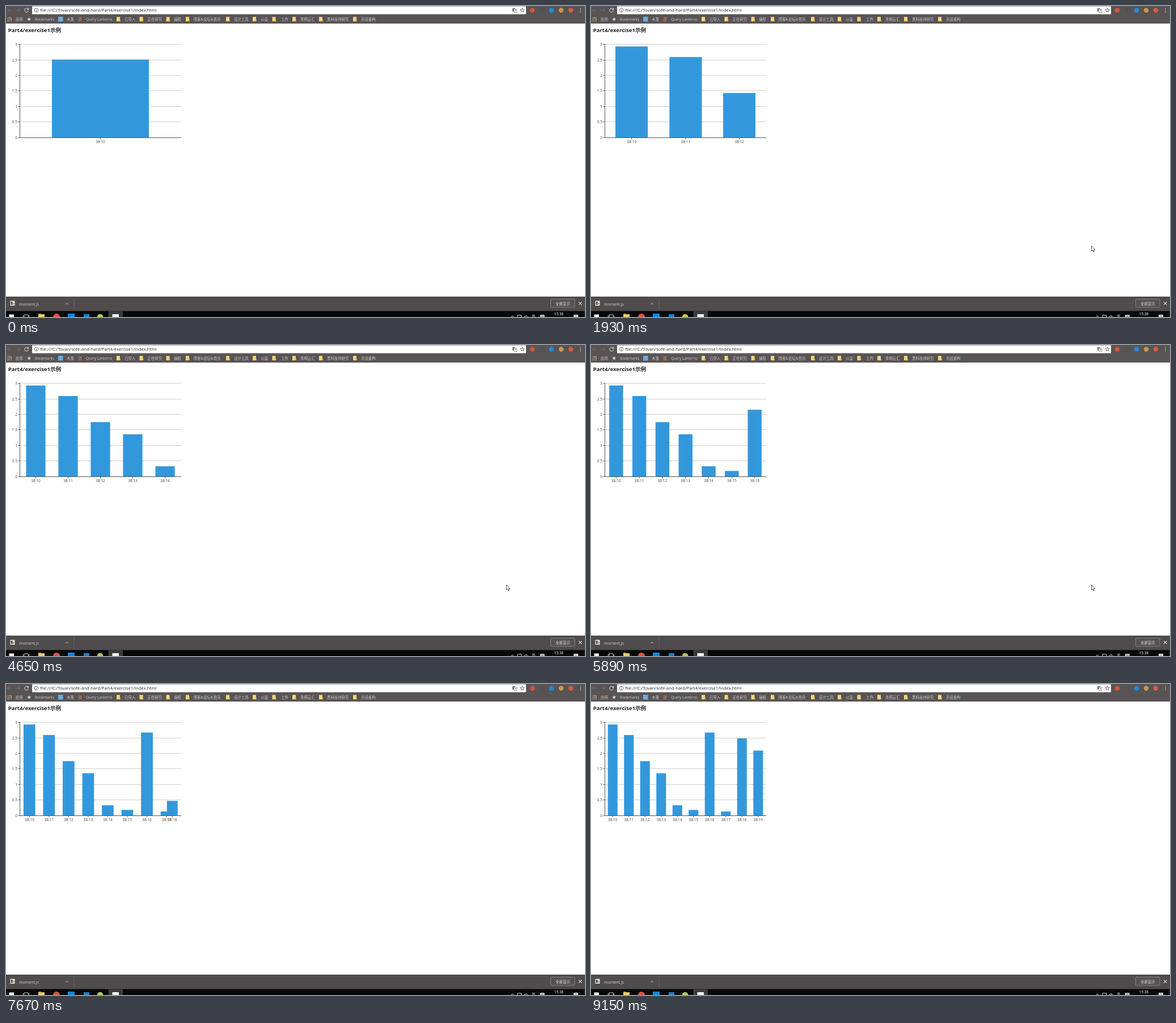
Write an HTML page that moves like this. It is 1021x549 px and loops after 9.23 s.

```html
<!DOCTYPE html>
<html lang="zh">
<head>
<meta charset="utf-8">
<title>Part4/exercise1</title>
<style>
  html, body { margin: 0; width: 100%; height: 100%; overflow: hidden; background: #fff; }
  svg { display: block; width: 100%; height: 100%; }
  text { font-family: "Open Sans", "Noto Sans CJK SC", "Noto Sans CJK", sans-serif; white-space: pre; }
</style>
</head>
<body>
<svg id="stage" viewBox="0 0 1021 549"></svg>
<script>
const stage = document.getElementById('stage');

function el(tag, attrs, parent = stage) {
  const node = document.createElementNS('http://www.w3.org/2000/svg', tag);
  for (const key in attrs) node.setAttribute(key, attrs[key]);
  parent.appendChild(node);
  return node;
}
const rect = (x, y, width, height, fill, more) => el('rect', { x, y, width, height, fill, ...more });
const dot = (cx, cy, r, fill, more) => el('circle', { cx, cy, r, fill, ...more });
const path = (d, stroke, width = 1, fill = 'none') =>
  el('path', { d, stroke, 'stroke-width': width, fill });
function label(x, y, size, fill, content, more) {
  const node = el('text', { x, y, 'font-size': size, fill, ...more });
  node.textContent = content;
  return node;
}
const starPath = (cx, cy, r) => 'M' + Array.from({ length: 10 }, (_, i) => {
  const a = i * Math.PI / 5 - Math.PI / 2, d = i % 2 ? r * 0.42 : r;
  return (cx + d * Math.cos(a)).toFixed(2) + ' ' + (cy + d * Math.sin(a)).toFixed(2);
}).join('L') + 'Z';

// Address bar
function drawToolbar() {
  rect(0, 0, 1021, 31, '#585455');
  path('M10 7.5H3M6 4.2L2.8 7.5L6 10.8', '#777374', 0.9);
  path('M17.500 7.500H24.500M21.500 4.200L24.700 7.500L21.500 10.800', '#777374', 0.9);
  path('M39 5.400A3.500 3.500 0 1 0 39.600 8.300M39.700 3.500V6.300H36.900', '#e2e0e0', 1);
  rect(46, 0.5, 871, 14, '#fff', { rx: 1 });
  dot(53.5, 7.5, 3.3, 'none', { stroke: '#555', 'stroke-width': 0.8 });
  path('M53.5 5.300V6.200M53.5 7V9.700', '#555', 0.9);
  label(60, 10.2, 7.72, '#2c2c2c', 'file:///C:/Tovan/sofe-and-hard/Part4/exercise1/index.html');
  rect(893, 4, 5, 5.5, '#666');
  rect(896, 6, 5, 5.5, '#fff', { stroke: '#777', 'stroke-width': 0.7 });
  label(894, 8.5, 4, '#fff', '文');
  path('M897.300 8H900M898.600 7V10.500', '#777', 0.6);
  path(starPath(910.500, 7.700, 4), '#555', 0.8);
  dot(928, 7.5, 4.3, '#d4553c');
  dot(945, 7.5, 3.5, '#4f5455');
  dot(962, 7.5, 4.3, '#1b8fe0');
  dot(979, 7.5, 4.2, '#c69a4b');
  dot(996, 7.5, 4.2, '#dc5a43');
  for (const y of [4.5, 7.5, 10.5]) dot(1013, y, 0.8, '#ddd');
}

function drawBookmarks() {
  const color = '#cfcccc', base = 25.6;
  const tints = ['#e0604c', '#e0b04c', '#67b06a', '#5b9be0'];
  for (let i = 0; i < 9; i++)
    rect(2.5 + i % 3 * 2.8, 19.7 + Math.floor(i / 3) * 2.8, 2, 2, tints[i % 4]);
  label(17, base, 6.4, color, '应用');
  path(starPath(40.700, 23.400, 3.900), 'none', 0, '#d0cdcd');
  label(51, base, 6.45, color, 'Bookmarks');
  rect(92, 19, 8.5, 8.5, '#69aee0');
  label(107, base, 6.4, color, '木笺');
  rect(127.5, 20, 6, 7, '#96694f');
  label(141, base, 6.4, color, 'Query Lanterns');
  const folders = [
    [195, 209, '已导入'], [235.5, 249.5, '正在研究'], [282.5, 296.2, '编程'],
    [317, 330.5, '博客&论坛&资讯'], [388, 402, '设计工具'], [435, 449, '公益'],
    [469.5, 485, '工作'], [505, 519, '青桐云汇'], [552, 566, '黑科技待研究'],
    [612, 626, '页设重构']
  ];
  for (const [x, tx, name] of folders) {
    rect(x, 19.3, 6, 7.8, '#f3d676');
    rect(x + 4.5, 24, 2.2, 3.1, '#e3bd55');
    label(tx, base, 6.4, color, name);
  }
}

// Download shelf and the cropped system bar
function drawBottom() {
  rect(0, 513, 1021, 26, '#504c4e');
  rect(0, 513, 1021, 0.7, '#444042');
  rect(7.5, 520.5, 8, 8.5, '#e6e4dc');
  rect(8.7, 522, 3, 5.5, '#55534d');
  rect(12.3, 524.5, 2, 2.5, '#8a8778');
  label(23, 528.8, 7, '#d6d3d4', 'moment.js');
  path('M105 526.800L107.500 524.300L110 526.800', '#ddd', 0.9);
  rect(119.5, 516, 1, 20, '#686466');
  rect(960.5, 517.5, 42.5, 14.5, '#555153', { rx: 1.5, stroke: '#8b8889', 'stroke-width': 0.9 });
  label(969, 527.5, 6.5, '#e2e0e0', '全部显示');
  path('M1010 522.500L1015.200 527.700M1015.200 522.500L1010 527.700', '#dad8d8', 1.1);

  rect(0, 538.5, 1021, 10.5, '#070909');
  rect(180.5, 538.5, 25.5, 10.5, '#3b3d3d');
  rect(5.5, 544.5, 8.5, 4.5, '#f2f2f2');
  path('M32 549V545H39V549M30.300 546V549M40.700 546V549', '#ddd', 0.9);
  rect(57, 544.2, 11, 4.8, '#f0cf71');
  rect(57, 543.2, 5, 1.5, '#dcae4b');
  dot(89, 549, 6, '#d9573f');
  rect(109, 543, 12, 6, '#1287dc');
  rect(137, 544, 10, 5, '#1b80c8');
  dot(166, 549, 5.3, '#b9c956');
  rect(187.5, 544, 11.5, 5, '#f4f4f4');
  path('M890.500 549L893 546.800L895.500 549', '#ddd', 0.9);
  path('M902 549V545.800H909V549', '#ddd', 0.9);
  path('M914 549V547.700H915.500L917.500 546V549M919 547L921 549', '#ddd', 0.8);
  label(927, 550.5, 6.6, '#fff', '英');
  rect(942, 545.3, 7.5, 3.7, '#e8e8e8');
  rect(943.5, 547, 4.5, 0.8, '#222');
  label(966.7, 546.3, 6.4, '#fff', '15:38');
  rect(1001, 545, 8, 4, '#f0f0f0');
  rect(1002.5, 546.7, 5, 0.7, '#333');
  rect(1019.5, 538.5, 0.7, 10.5, '#4a4c4c');
}

// Chart
const LEFT = 24, WIDTH = 285, ZERO = 232.2, UNIT = 54.87;
const values = [2.93, 2.59, 1.75, 1.36, 0.33, 0.18, 2.67, 0.13, 2.48, 2.15];
const startOf = i => i ? 992.7 * i - 301 : -279;

function drawAxes() {
  for (let v = 0; v <= 3; v += 0.5) {
    const y = Math.floor(ZERO - v * UNIT) + 0.5;
    if (v) path(`M25 ${y}H309`, '#d0d0d0');
    path(`M21.500 ${y}H24`, '#666');
    label(20, y + 2.4, 6.5, '#444', String(v), { 'text-anchor': 'end' });
  }
}

drawToolbar();
drawBookmarks();
label(3.7, 46.4, 9.6, '#222', 'Part4/exercise1示例', { 'font-weight': 700 });
drawAxes();
const bars = values.map(() => rect(0, 0, 0, 0, '#3398db'));
path('M24.500 67V233M24 232.500H309', '#555');
const marks = values.map((_, i) => ({
  tick: rect(0, 233, 1, 2.5, '#666'),
  text: label(0, 242.3, 6.55, '#444', '38:' + (10 + i), { 'text-anchor': 'middle' })
}));
drawBottom();
const cursor = path('M0 0V9.200L2.100 7.300L3.500 10.500L4.900 9.900L3.500 6.800H6.300Z', '#222', 0.75, '#fff');

const LOOP = 9230;
const route = [
  [600, 961, 546], [920, 894, 448], [1000, 885, 440], [1250, 882.5, 423.5],
  [6250, 882.5, 423.5], [6510, 903, 437], [6950, 1011, 500], [7490, 1009, 545]
];
const mix = (a, b, k) => a + (b - a) * k;
const clamp = k => Math.min(1, Math.max(0, k));
const cubicOut = k => 1 - (1 - k) ** 3;
const expoOut = k => k >= 1 ? 1 : 1 - 2 ** (-10 * k);

function moveCursor(t) {
  const next = route.findIndex(p => p[0] > t);
  cursor.setAttribute('visibility', next > 0 ? 'visible' : 'hidden');
  if (next < 1) return;
  const a = route[next - 1], b = route[next], k = (t - a[0]) / (b[0] - a[0]);
  cursor.setAttribute('transform', `translate(${mix(a[1], b[1], k)} ${mix(a[2], b[2], k)})`);
}

function render(t) {
  const count = values.filter((_, i) => startOf(i) <= t).length;
  const shift = cubicOut(clamp((t - startOf(count - 1)) / 300));
  const slot = WIDTH / count, oldSlot = WIDTH / Math.max(1, count - 1);
  values.forEach((value, i) => {
    const shown = i < count ? 'visible' : 'hidden';
    const { tick, text } = marks[i];
    for (const node of [bars[i], tick, text]) node.setAttribute('visibility', shown);
    if (i >= count) return;
    // The newest bar rises in place while the others slide over
    const step = i === count - 1 ? slot : mix(oldSlot, slot, shift);
    const x = LEFT + step * (i + 0.5);
    const h = value * UNIT * expoOut(clamp((t - startOf(i)) / 1000));
    bars[i].setAttribute('x', x - step * 0.3);
    bars[i].setAttribute('width', step * 0.6);
    bars[i].setAttribute('y', ZERO - h);
    bars[i].setAttribute('height', h);
    tick.setAttribute('x', x - 0.5);
    text.setAttribute('x', x);
  });
  moveCursor(t);
}

const begin = performance.now();
function frame() {
  render((performance.now() - begin) % LOOP);
  requestAnimationFrame(frame);
}
frame();
</script>
</body>
</html>
```
